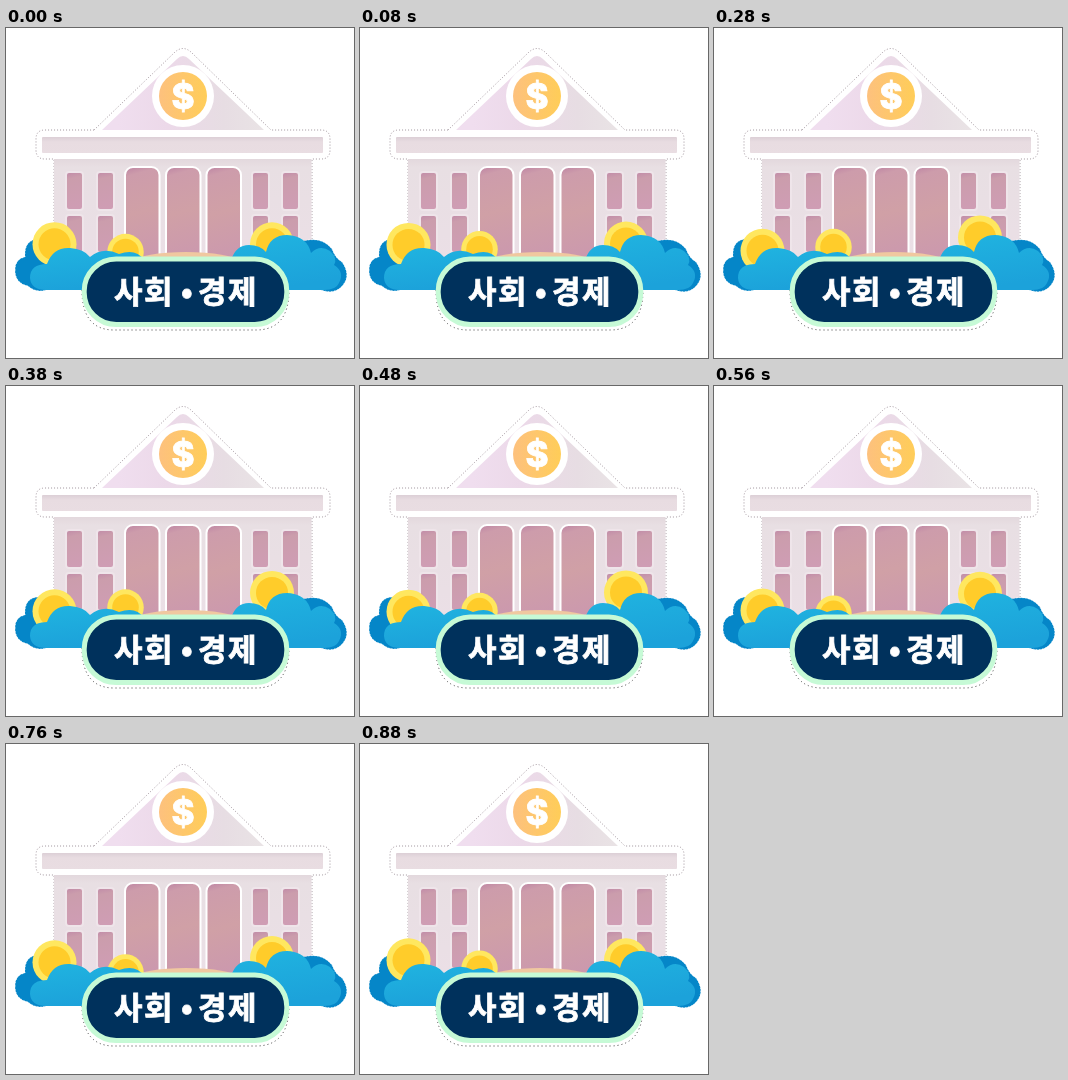
These frames come from a looping animation (348 px wide and 330 px high, 900 ms). An HTML page:

```html
<!DOCTYPE html>
<html lang="ko">
<head>
<meta charset="utf-8">
<style>
html, body { margin: 0; width: 100%; height: 100%; overflow: hidden; background: #fff; }
svg { display: block; }
.edge { fill: #fff; stroke: #8a7a84; stroke-width: .8; stroke-dasharray: 1 2; }
.dark { stroke: #111; stroke-dasharray: 1 3; }
.leaf { stroke: #fff; stroke-width: .8; stroke-dasharray: 1 2; }
.title { font: 900 31px "Noto Sans CJK KR", "Noto Sans CJK", sans-serif; letter-spacing: 1.5px; fill: #fff; stroke: #fff; stroke-width: .8; text-anchor: middle; }
.dollar { font: 800 35px "Inter", sans-serif; fill: #fff; stroke: #fff; stroke-width: .8; text-anchor: middle; }
</style>
</head>
<body>
<svg width="348" height="330" viewBox="0 0 348 330">
  <defs>
    <linearGradient id="roof"><stop offset=".1" stop-color="#f0deef"/><stop offset=".4" stop-color="#ecd9e9"/><stop offset=".75" stop-color="#e7dde3"/><stop offset="1" stop-color="#e9e3e5"/></linearGradient>
    <linearGradient id="beam" x2="0" y2="1"><stop stop-color="#dccfd6"/><stop offset=".3" stop-color="#e8dce1"/><stop offset="1" stop-color="#e9dde2"/></linearGradient>
    <linearGradient id="wall" x2="0" y2="1"><stop stop-color="#e3d8dd"/><stop offset=".08" stop-color="#e8dfe3"/><stop offset="1" stop-color="#ebdfe6"/></linearGradient>
    <linearGradient id="door" x2=".1" y2="1"><stop stop-color="#bd84a3"/><stop offset=".1" stop-color="#cd9cab"/><stop offset=".5" stop-color="#d0a0a6"/><stop offset="1" stop-color="#cb98ae"/></linearGradient>
    <linearGradient id="pane" x2=".1" y2="1"><stop stop-color="#c08aa8"/><stop offset=".2" stop-color="#cb9dac"/><stop offset="1" stop-color="#cf9db4"/></linearGradient>
    <linearGradient id="medal"><stop stop-color="#fdc17e"/><stop offset="1" stop-color="#ffcd58"/></linearGradient>
    <linearGradient id="front" x2=".3" y2="1"><stop stop-color="#20b4e0"/><stop offset="1" stop-color="#1ca2da"/></linearGradient>
    <g id="coin"><circle r="22" fill="#ffe75f"/><circle r="16" fill="#ffcc2a"/></g>
  </defs>

  <path class="edge" d="M88 102L168 25Q177 16 186 25L265 102H315Q324 102 324 111V122Q324 131 315 131H306V236H48V131H39Q30 131 30 122V111Q30 102 39 102Z"/>
  <path class="edge dark" d="M76 262Q76 302 108 302H250Q283 302 283 262Z"/>

  <path fill="url(#roof)" d="M96 102L171 31Q177 25 183 31L258 102Z"/>
  <rect x="36" y="109" width="281" height="16" rx="1" fill="url(#beam)"/>
  <rect x="48" y="131" width="257.500" height="105" fill="url(#wall)"/>
  <g id="openings"></g>
  <circle cx="177" cy="68" r="31" fill="#fff"/>
  <circle cx="177" cy="68" r="24" fill="url(#medal)"/>
  <text class="dollar" x="177" y="80.500">$</text>
  <ellipse cx="180" cy="233" rx="50" ry="9" fill="#f0c8a0"/>

  <g class="leaf" fill="#0586c8">
    <path d="M9 242Q9 231 19 229Q18 212 32 211Q60 212 64 262H40Q30 265 22 258Q9 255 9 242Z"/>
    <path d="M280 262L291 215Q314 206 326 221Q329 230 336 234Q345 247 337 257Q329 267 315 262Z"/>
  </g>

  <use id="left" href="#coin"/>
  <use id="middle" href="#coin"/>
  <use id="right" href="#coin"/>

  <g fill="url(#front)">
    <path d="M24 250Q24 236 41 236Q47 219 64 220Q78 221 84 229Q97 218 113 226Q130 220 138 232V262H40Q25 262 24 250Z"/>
    <path d="M225 232Q230 217 243 217Q254 217 260 224Q264 207 281 207Q301 208 305 225Q314 216 324 223Q332 230 328 237Q339 244 333 255Q330 262 318 262H225Z"/>
  </g>

  <rect x="78.200" y="231" width="202.600" height="65.500" rx="32" fill="#00315c" stroke="#c6fad6" stroke-width="5"/>
  <text class="title" y="274.500"><tspan x="138">사회</tspan><tspan x="181.500">•</tspan><tspan x="222">경제</tspan></text>
</svg>
<script>
const PERIOD = 900, STEP = 20;
const openings = document.getElementById("openings");

function addOpening(x, y, width, height, rx, fill, stroke) {
  const rect = document.createElementNS("http://www.w3.org/2000/svg", "rect");
  const attrs = { x, y, width, height, rx, fill: `url(#${fill})`, stroke, "stroke-width": 2 };
  for (const name in attrs) rect.setAttribute(name, attrs[name]);
  openings.append(rect);
}
for (const x of [60, 91, 246, 276])
  for (const y of [144, 187]) addOpening(x, y, 17, 38, 3, "pane", "#efe5ea");
for (const x of [119, 160, 200.5]) addOpening(x, 139, 34.5, 98, 8, "door", "#fff");

function place(id, x, y, scale = 1) {
  document.getElementById(id).setAttribute("transform", `translate(${x} ${y}) scale(${scale})`);
}
function draw() {
  const time = Math.floor(performance.now() % PERIOD / STEP) * STEP;
  const angle = time / PERIOD * 2 * Math.PI;
  place("left", 48.5, 221 - 4.8 * Math.cos(angle));
  place("middle", 119.5, 224 - 5.3 * Math.sin(angle), .83);
  place("right", 266, 211.3 + 5 * Math.cos(angle));
  requestAnimationFrame(draw);
}
draw();
</script>
</body>
</html>
```
